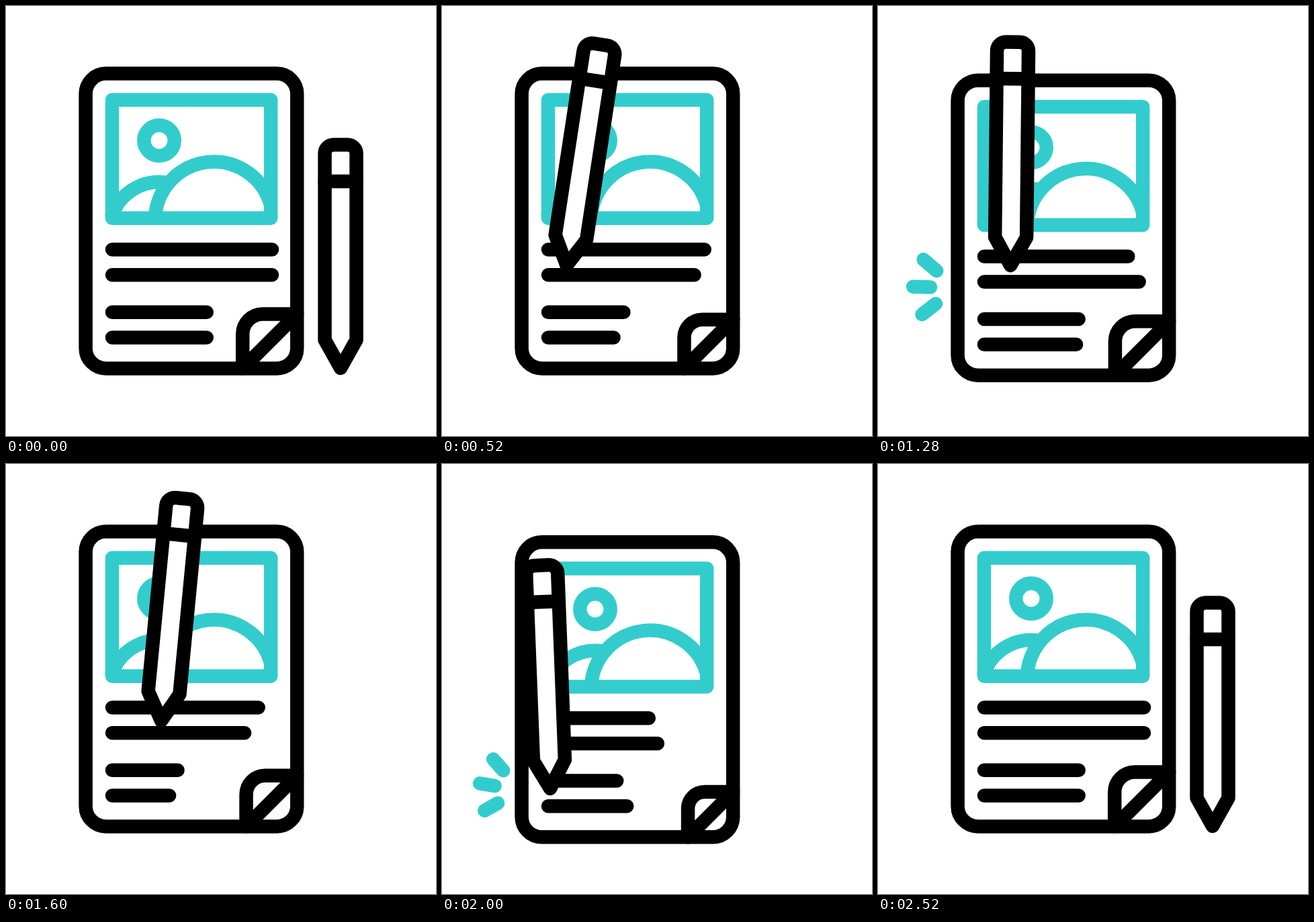
Write an HTML page that moves like this. It is 640 px wide and 640 px high and loops after 3 s.

```html
<!DOCTYPE html>
<html lang="en">
<head>
<meta charset="utf-8">
<title>Article and pencil</title>
<style>
  html, body { margin: 0; width: 100%; height: 100%; overflow: hidden; background: #fff; }
  svg { display: block; width: 100vw; height: 100vh; }
  path, rect, circle { fill: none; stroke-width: 20.5; stroke-linecap: round; stroke-linejoin: round; }
  .ink { stroke: #000; }
  .teal { stroke: #33cccc; }
  .teal .hill { stroke-linecap: butt; }
  #pen .body { fill: #fff; }
</style>
</head>
<body>
<svg viewBox="0 0 640 640">
  <g id="page">
    <g class="teal">
      <circle cx="228" cy="200.3" r="22.7"/>
      <path class="hill" d="M156.7 315.5A74.3 74.3 0 0 1 240 263"/>
      <path class="hill" d="M222 315.5A87.6 87.6 0 0 1 394.2 297"/>
      <rect x="158" y="139.7" width="236.2" height="176"/>
    </g>
    <g class="ink">
      <rect x="118.6" y="100.6" width="314.6" height="438.8" rx="30"/>
      <path id="fold"/>
      <path id="lines"/>
    </g>
  </g>
  <path class="teal" id="sparks"/>
  <g class="ink" id="pen">
    <path class="body" d="M0 0L-23.5 -42V-319.5a13 13 0 0 1 13 -13h21a13 13 0 0 1 13 13V-42Z"/>
    <path d="M-23.5 -278h47"/>
  </g>
</svg>
<script>
const LOOP = 3000, STEP = 40;
const $ = id => document.getElementById(id);
const clamp = v => Math.min(1, Math.max(0, v));
const smooth = v => v * v * (3 - 2 * v);
const mix = (a, b, k) => a + (b - a) * k;

// Eased 0 -> 1 -> 0 swing lasting `half` each way, repeated twice
function swing(t, start, half, gap = 0) {
  const cycle = 2 * half + gap, local = t - start;
  if (local < 0 || local >= 2 * cycle) return 0;
  return smooth(clamp(1 - Math.abs(local % cycle / half - 1)));
}

// Two long text lines, then two short ones; the lowest starts first
function textLine(t, i) {
  const short = i > 1;
  const y = 362.6 + 37.7 * i + (short ? 17.8 : 0);
  const width = short ? 140.7 : 238, shrink = short ? 63 : 91;
  return `M158 ${y}h${width - shrink * swing(t, 447 - 80 * i, 500)}`;
}

function foldCorner(t) {
  const size = 81 - 14.3 * swing(t, 200, 580), r = size * 0.37;
  return `M${433.2 - size} 539.4v${r - size}a${r} ${r} 0 0 1 ${r} ${-r}H433.2Z`;
}

// Three rays fanned around a hub: the outer ends shoot out, the inner ends follow
function burst(age, hubY, turn) {
  const tip = 1 - (1 - clamp(age / 200)) ** 2;
  const tail = smooth(clamp((age - 170) / 130));
  if (tip <= tail) return "";
  const point = (angle, k) => {
    const r = mix(39, 66, k), a = angle * Math.PI / 180;
    return `${117 - r * Math.cos(a)} ${hubY - r * Math.sin(a)}`;
  };
  return [-39, 0, 39].map(fan => `M${point(turn + fan, tail)}L${point(turn + fan, tip)}`).join("");
}

// Pencil stops: time, tip x, tip y, tilt
const penStops = [
  [230, 498, 539, 0],
  [520, 185.5, 386, 8.7],
  [780, 172, 358, 8.5],
  [1000, 161.6, 369.7, 6.4],
  [1280, 197.2, 386.2, 0.6],
  [1600, 231, 382.2, 5.5],
  [2000, 161, 483, -2.2],
  [2470, 498, 539, 0]
];

function penPose(t) {
  const next = penStops.findIndex(stop => stop[0] > t);
  if (next <= 0) return penStops[0];
  const a = penStops[next - 1], b = penStops[next];
  const k = smooth((t - a[0]) / (b[0] - a[0]));
  return a.map((v, n) => mix(v, b[n], k));
}

function draw(t) {
  $("page").setAttribute("transform", `translate(0 ${26 * swing(t, 840, 280, 200)})`);
  $("lines").setAttribute("d", [0, 1, 2, 3].map(i => textLine(t, i)).join(""));
  $("fold").setAttribute("d", foldCorner(t));
  $("sparks").setAttribute("d", burst(t - 1120, 419.5, 1.5) + burst(t - 1880, 485.5, 9.5));

  const [, x, y, tilt] = penPose(t);
  $("pen").setAttribute("transform", `translate(${x} ${y}) rotate(${tilt})`);
}

const origin = performance.now();
function tick() {
  const t = (performance.now() - origin) % LOOP;
  draw(Math.floor(t / STEP) * STEP);
  requestAnimationFrame(tick);
}
tick();
</script>
</body>
</html>
```
